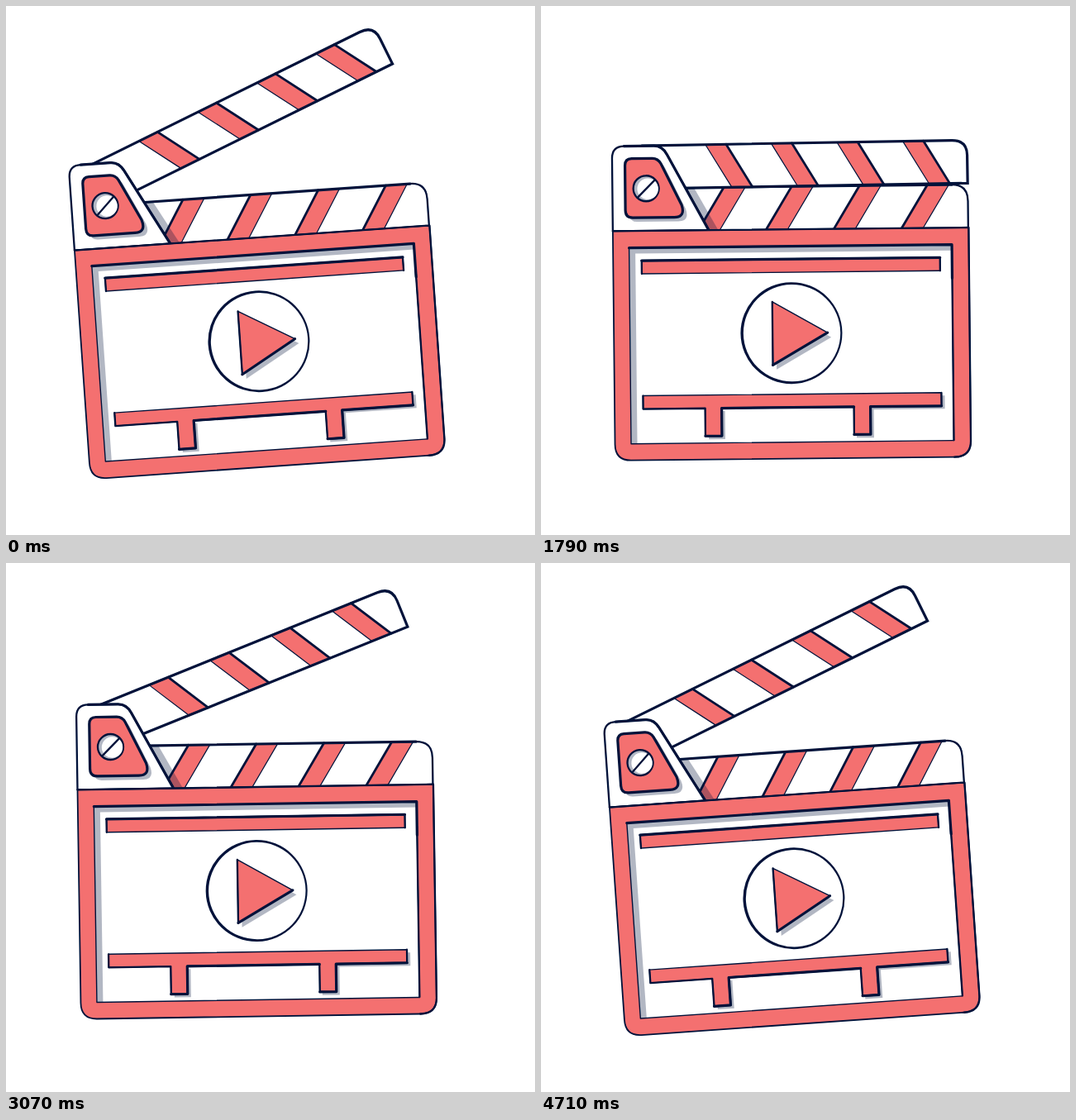
An HTML page that plays this animation: 640x640 px, repeating every 4.78 s.

```html
<!DOCTYPE html>
<html lang="en">
<head>
<meta charset="utf-8">
<title>Clapperboard</title>
<style>
  html, body { margin: 0; width: 100%; height: 100%; overflow: hidden; background: #fff; }
  svg { display: block; width: 100%; height: 100%; }
  .ink { fill: none; stroke: #00123a; stroke-linejoin: round; stroke-linecap: round; stroke-width: 1.4; }
  .mid { stroke-width: 2.3; }
  .bold { stroke-width: 3.2; }
  .sharp { stroke-linejoin: miter; }
  .red { fill: #f47070; }
  .white { fill: #fff; }
  .shade { fill: #00123a; fill-opacity: .3; }
</style>
</head>
<body>
<svg viewBox="0.8 0.6 640 640">
  <g id="board">
    <!-- fixed clapper -->
    <path class="white" d="M140 217H499Q519 217 519 237V269H140Z"/>
    <g id="lower"></g>
    <path class="shade" d="M176 217H187L216 269H204Z"/>
    <path class="ink bold" d="M170 217H499"/>
    <path class="ink mid" d="M499 217Q518.5 217 518.5 237V269"/>

    <!-- moving clapper -->
    <g id="arm">
      <path class="white" d="M125 166H500Q518.4 166 518.4 184V218.1H125Z"/>
      <g id="upper"></g>
      <path class="ink bold sharp" d="M125 166H500Q518.4 166 518.4 184V218.1H125"/>
    </g>

    <!-- hinge plate -->
    <path class="ink white mid" d="M88.5 269V181Q88.5 166.3 103 166.3H139Q149.5 166.3 155 177L205 269Z"/>
    <path class="ink bold" d="M103 166.3H139Q149.5 166.3 155 177L204 268"/>
    <g id="hinge"></g>
    <circle class="ink mid" style="fill:#b2b7c4" cx="129.3" cy="217.8" r="15.5"/>
    <circle class="white" cx="131.3" cy="218.3" r="12.7"/>
    <path class="ink mid" d="M119.8 227.8L139.8 207.8"/>

    <!-- slate frame -->
    <path class="ink red" style="stroke-width:1.8" d="M88.5 269H519V527Q519 546.5 499 546.5H108Q88.5 546.5 88.5 527Z"/>
    <path class="ink mid" d="M88.5 269H519V527Q519 546.5 499 546.5"/>
    <path class="ink white" d="M108 289.5H498.5V526.5H108Z"/>
    <path class="shade" d="M108 289.5H498.5V296.5H115.5V526.5H108Z"/>
    <path class="ink bold" d="M108 289.5H498.5V330"/>
    <path class="ink mid" d="M498.5 320V526"/>

    <path class="ink red" d="M123 305H484V321H123Z"/>
    <path class="ink mid" d="M123 321V305H484V321"/>
    <path class="ink bold" d="M123 305H484"/>

    <!-- timeline -->
    <path class="shade" d="M484 472H488V488H402V522H381V518H398V484H484ZM218 488H222V522H202V518H218Z"/>
    <path class="ink red" d="M123 468.5H484V484.5H398V518H378V484.5H218V518H198V484.5H123Z"/>
    <path class="ink mid" d="M123 468.5V484.5H198V518H218V484.5H378V518H398V484.5H484V468.5"/>
    <path class="ink bold" d="M198 518H218V484.5H378M378 518H398V484.5H484"/>

    <!-- play button -->
    <circle cx="303.3" cy="394.5" r="61.5" fill="#00123a"/>
    <circle cx="303.9" cy="394.5" r="58.7" class="white"/>
    <g id="play">
      <path class="shade" d="M285 362L351.5 400L285 438.5Z"/>
      <path class="ink red" d="M280.5 356.5L347 394.5L280.5 433Z"/>
      <path class="ink mid" d="M280.5 356.5V433"/>
      <path class="ink bold" d="M280.5 433L347 394.5"/>
    </g>
  </g>
</svg>
<script>
  const $ = id => document.getElementById(id);
  const FPS = 14, LOOP = 4780, HALF = 33 / FPS * 1000;
  const OPEN = -22.3, SHUT = -0.4;

  // Slanted stripes: one heavy edge, one fine edge
  function stripes(id, x, pitch, width, top, bottom, slant, heavyRight) {
    let out = '';
    for (let i = 0; i < 4; i++) {
      const l = x + i * pitch, r = l + width;
      const edge = (a, heavy) =>
        `<path class="ink" style="stroke-width:${heavy ? 2.8 : 1.2}" d="M${a} ${top}L${a + slant} ${bottom}"/>`;
      out += `<path class="red" d="M${l} ${top}H${r}L${r + slant} ${bottom}H${l + slant}Z"/>` +
        edge(l, !heavyRight) + edge(r, heavyRight);
    }
    $(id).innerHTML = out;
  }
  stripes('lower', 223.5, 82, 26, 217, 269, -31.5, false);
  stripes('upper', 202, 79.6, 25, 166, 218, 31, true);

  // Hinge face over its own shadow
  const face = 'M112 181.5H137Q144 181.5 147.5 188L172 238Q177 253 163 253H113Q104 253 104 244V190Q104 181.5 112 181.5Z';
  $('hinge').innerHTML =
    `<path class="shade" transform="translate(5 5)" d="${face}"/><path class="ink red bold" d="${face}"/>`;

  const ease = (t, start, length) => {
    const s = Math.min(1, Math.max(0, (t - start) / length));
    return s * s * (3 - 2 * s);
  };

  function draw(t) {
    const tilt = -4 * (1 - ease(t, 0, HALF) + ease(t, HALF, HALF));
    const lift = 1 - ease(t, 0, 630) + ease(t, 2360, 825);
    const size = 1 + 0.1 * (ease(t, 200, 390) - ease(t, 590, 410));
    $('board').setAttribute('transform', `rotate(${tilt} 475 351)`);
    $('arm').setAttribute('transform', `rotate(${SHUT + (OPEN - SHUT) * lift} 129.6 221.7)`);
    $('play').setAttribute('transform',
      `translate(303 394.7) scale(${size}) translate(-303 -394.7)`);
  }

  // The picture holds on each step of FPS
  function tick() {
    const t = performance.now() % LOOP;
    draw(Math.floor((t + 6) * FPS / 1000) * 1000 / FPS);
    requestAnimationFrame(tick);
  }
  tick();
</script>
</body>
</html>
```
